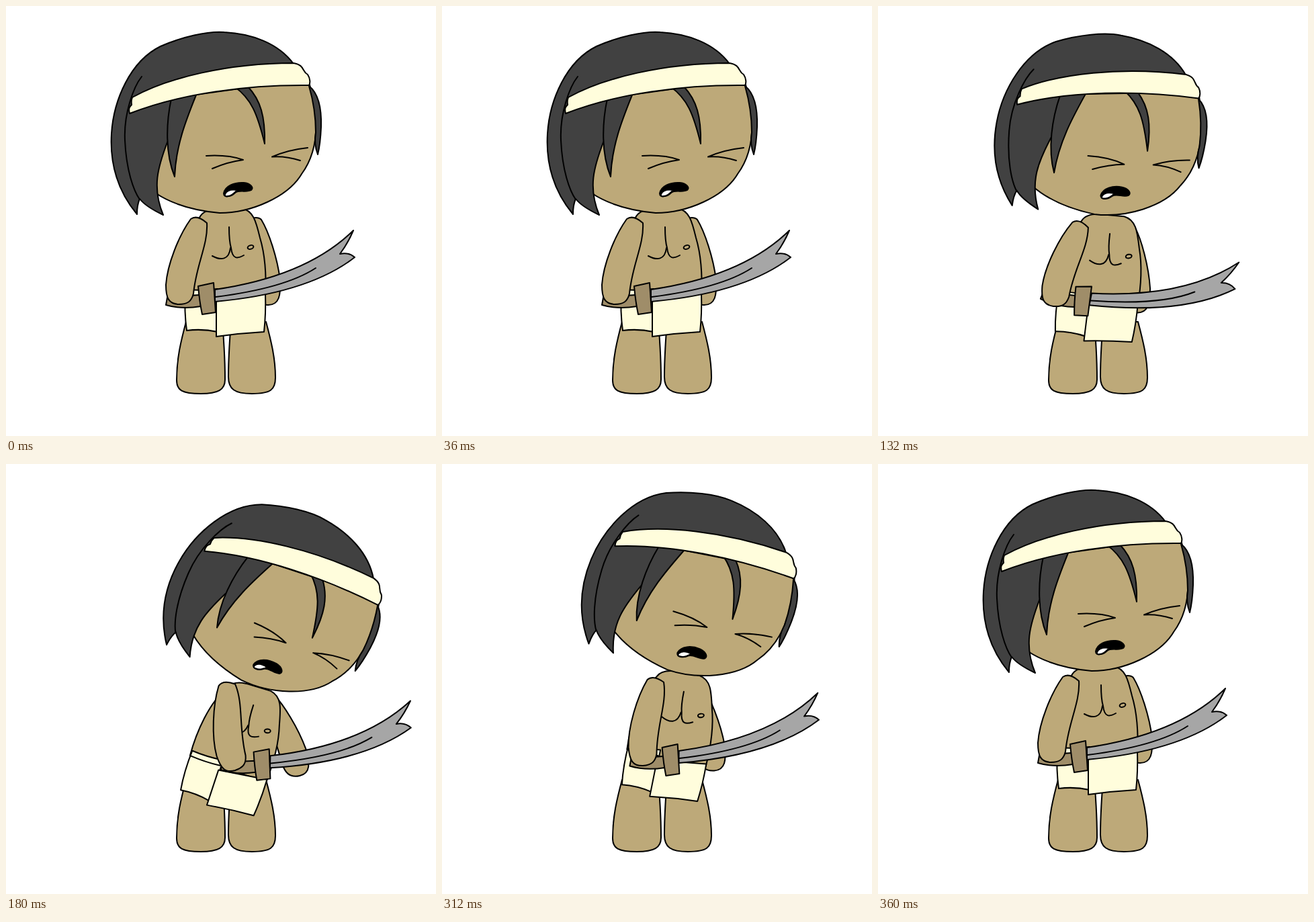
Animation, 640 px wide and 640 px high, one loop 0.42 s. Source, as an HTML page:

```html
<!DOCTYPE html>
<html lang="en">
<head>
<meta charset="utf-8">
<title>Swordsman flinching</title>
<style>
  html, body { margin: 0; height: 100%; overflow: hidden; background: #fff; }
  svg { display: block; width: 100vw; height: 100vh; }
  path, ellipse { stroke: #000; stroke-width: 2; stroke-linejoin: round; stroke-linecap: round; fill: none; }
  .skin { fill: #bda979; }
  .hair { fill: #414141; }
  .cloth { fill: #fffddc; }
  .steel { fill: #a6a6a6; }
  .wood { fill: #9f8d69; }
  .black { fill: #000; }
  .white { fill: #fff; }
</style>
</head>
<body>
<svg viewBox="0 0 640 640">
  <path id="backArm" class="skin" d="M362 318C368 314 376 314 380 318C391 336 404 375 408 408C409 430 407 445 390 445C376 445 370 436 369 424Z"/>

  <g id="legs">
    <path class="skin" d="M268 470C260 500 254 525 254 557C254 572 262 577 290 577C316 577 326 571 326 556Q326 520 322 470Z"/>
    <path class="skin" d="M335 470Q331 520 331 552C331 570 340 577 366 577C394 577 401 571 401 553C401 525 395 500 387 470Z"/>
  </g>

  <g id="torso">
    <path class="skin" d="M288 315C292 306 302 303 312 302L350 301C368 304 372 320 378 345C384 365 388 395 386 432L266 430C264 395 268 345 288 315Z"/>
    <path d="M332 329Q332 350 335 360C337 378 345 376 354 371M334 360C332 378 320 379 307 372"/>
    <ellipse cx="364" cy="359" rx="4.5" ry="2.8" transform="rotate(-18 364 359)"/>
    <path class="cloth" d="M267 422Q290 424 315 421V485Q292 480 269 483Q265 455 267 422Z"/>
    <path d="M267 430Q290 432 313 430"/>
    <path class="cloth" d="M313 437L386 428Q387 458 384 485Q348 487 313 492Z"/>
  </g>

  <g id="sword">
    <path class="wood" d="M288 430L240 434L238 445Q262 452 290 447Z"/>
    <path class="steel" d="M311 422C380 412 460 390 517 334Q509 353 497 369Q510 366 519 374C470 412 400 432 311 440Z"/>
    <path d="M312 433Q415 420 461 390"/>
    <path class="wood" d="M286 417L309 412L312 456L292 459Q288 440 286 417Z"/>
  </g>

  <path id="frontArm" class="skin" d="M275 317C282 312 290 315 299 323C301 355 283 385 279 428C276 440 270 444 257 444C242 443 238 435 238 415C240 385 257 342 275 317Z"/>

  <g id="head">
    <path class="skin" d="M450 110C465 160 468 212 440 250C420 284 365 308 318 308C285 305 250 297 222 278L210 265L235 170L284 120Z"/>
    <path class="hair" d="M451 119C465 130 470 150 469 180Q468 205 464 221Q458 206 461 188C461 160 457 140 451 119Z"/>
    <path class="hair" d="M195 310C170 280 154 240 157 190C160 140 185 82 230 60C262 46 300 37 325 39C365 41 405 55 428 86L440 110L283 132L240 203C226 240 217 270 234 311C215 302 205 295 199 287Q195 296 195 310Z"/>
    <path d="M202 105C190 120 175 160 177 200C179 245 190 275 199 288"/>
    <path class="hair" d="M246 138C238 175 237 220 251 254C253 205 270 165 284 130Z"/>
    <path class="hair" d="M340 120C365 138 374 160 385 205C386 165 379 140 360 120Z"/>
    <path class="cloth" d="M188 136C240 107 330 85 428 85C445 88 440 97 449 102C453 108 453 115 451 118C360 117 260 130 184 160C182 152 184 150 187 147Q186 141 188 136Z"/>
    <path d="M298 223Q330 221 353 229Q330 232 307 242M449 211Q420 214 396 224.5Q416 223 438 230"/>
    <path class="black" d="M324 279C326 268 340 262 354 263C364 264 369 270 365 274C358 278 347 273 341 278C335 284 324 286 324 279Z"/>
    <path class="white" d="M326 280Q330 272 344 274Q336 283 330 283Q325 284 326 280Z"/>
  </g>
</svg>
<script>
const loop = 420;
const poseEnds = [60, 180, 240, 360];
const rad = Math.PI / 180;

// Joints in the upright pose.
const neck = { x: 323.7, y: 225.8 };
const waist = { x: 348.5, y: 416.2 };
const shoulder = { x: 287, y: 318 };
const hand = { x: 258, y: 438 };
const guard = { x: 299, y: 436 };
const backHand = { x: 390, y: 444 };

function place(id, pivot, dx, dy, angle) {
  document.getElementById(id).setAttribute("transform",
    `translate(${dx} ${dy}) rotate(${angle} ${pivot.x} ${pivot.y})`);
}

const aim = (from, to) => Math.atan2(to.y - from.y, to.x - from.x) / rad;

// Where a joint ends up after turning about a pivot and moving.
function carry(joint, pivot, dx, dy, angle) {
  const x = joint.x - pivot.x, y = joint.y - pivot.y;
  const c = Math.cos(angle * rad), s = Math.sin(angle * rad);
  return { x: pivot.x + dx + x * c - y * s, y: pivot.y + dy + x * s + y * c };
}

// The body rocks once per turn; the arm reaches from the moving shoulder to the sword.
function setPose(turn) {
  const sway = (1 - Math.cos(turn)) / 2, side = Math.sin(turn);
  const rock = (swing, lag = 0, dip = 0) => swing * sway + lag * side + dip * side ** 2;

  const lean = [rock(8, -4, 2.4), rock(30.6, 0, -4), rock(18.3, -2.2)];
  const reach = [rock(82, -18.5, -18), rock(12, -1, -2)];
  const movedShoulder = carry(shoulder, waist, ...lean);
  const movedHand = carry(hand, hand, ...reach, 0);
  const armAngle = aim(movedShoulder, movedHand) - aim(shoulder, hand);

  place("torso", waist, ...lean);
  place("head", neck, rock(68, -15, -5), rock(24.6, -0.7, -8.4), rock(26.2, -6.1));
  place("sword", guard, ...reach, rock(1.7, 5.4, 5));
  place("frontArm", hand, ...reach, armAngle);
  place("backArm", backHand, rock(47, -10, -18.5), rock(19, 0, 2), armAngle * 0.7);
}

function draw() {
  const time = performance.now() % loop;
  const pose = poseEnds.filter(end => time >= end).length;
  setPose(pose * Math.PI / 2);
  requestAnimationFrame(draw);
}
draw();
</script>
</body>
</html>
```
